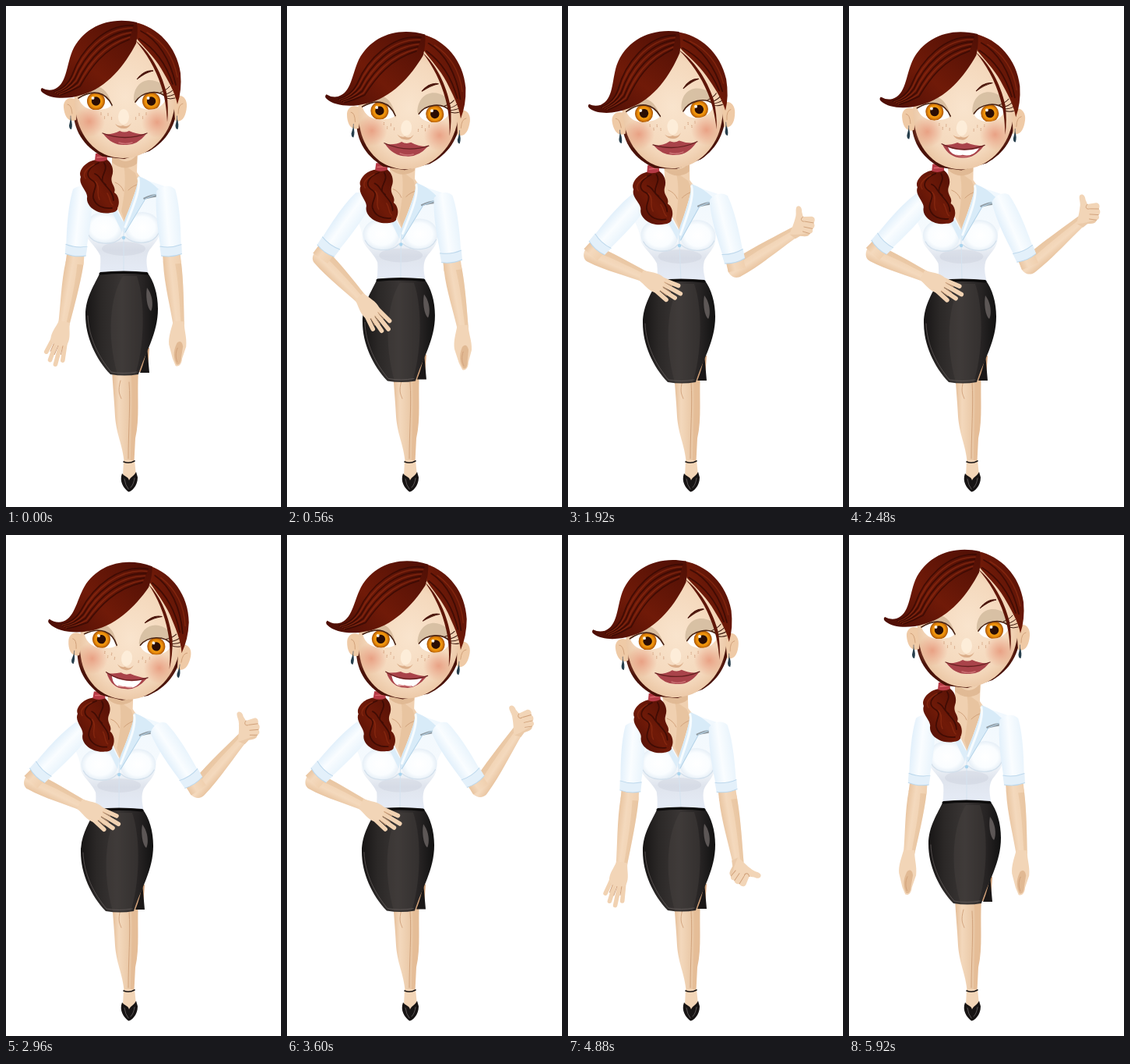
Recreate the animation shown at these times as an HTML page. Size 353x642 px, loop 6000 ms.

```html
<!DOCTYPE html>
<html lang="en">
<head>
<meta charset="utf-8">
<title>Presenter</title>
<style>
html, body { margin: 0; width: 100%; height: 100%; overflow: hidden; background: #fff; }
svg { display: block; width: 353px; height: 642px; }
.skin { fill: #f2d5b7; }
.shade { fill: #dfb68f; }
.line { fill: none; stroke-linecap: round; stroke-linejoin: round; }
.finger { fill: none; stroke: #f1d2b2; stroke-width: 5.6; stroke-linecap: round; }
.crease { fill: none; stroke: #cf9f78; stroke-width: .9; stroke-linecap: round; }
.dark { fill: none; stroke: #350803; stroke-width: 1.8; stroke-linecap: round; opacity: .75; }
.light { fill: none; stroke: #8c2b12; stroke-width: 1.5; stroke-linecap: round; opacity: .7; }
</style>
</head>
<body>
<svg viewBox="0 0 353 642">
<defs>
  <linearGradient id="hair" x1="0" y1="1" x2="1" y2="0">
    <stop offset="0" stop-color="#4a0d05"/><stop offset=".45" stop-color="#701a08"/><stop offset="1" stop-color="#4f0f05"/>
  </linearGradient>
  <linearGradient id="skirt">
    <stop offset="0" stop-color="#171515"/><stop offset=".22" stop-color="#2b2827"/><stop offset=".5" stop-color="#393534"/>
    <stop offset=".8" stop-color="#262323"/><stop offset="1" stop-color="#111"/>
  </linearGradient>
  <linearGradient id="shirt" x1="0" y1="0" x2="0" y2="1">
    <stop offset="0" stop-color="#f0f8fe"/><stop offset=".55" stop-color="#f6fafd"/>
    <stop offset=".75" stop-color="#dfe4ed"/><stop offset="1" stop-color="#e6ecf7"/>
  </linearGradient>
  <linearGradient id="sleeve">
    <stop offset="0" stop-color="#e2f0fb"/><stop offset=".45" stop-color="#fafdff"/><stop offset="1" stop-color="#e9f4fc"/>
  </linearGradient>
  <linearGradient id="arm">
    <stop offset="0" stop-color="#e9c5a1"/><stop offset=".4" stop-color="#f4d9bd"/><stop offset="1" stop-color="#f0d0af"/>
  </linearGradient>
  <linearGradient id="leg">
    <stop offset="0" stop-color="#e4bc96"/><stop offset=".35" stop-color="#f3d8bc"/><stop offset="1" stop-color="#e8c5a2"/>
  </linearGradient>
  <radialGradient id="face" cx=".5" cy=".5" r=".6">
    <stop offset="0" stop-color="#f9e4cd"/><stop offset=".65" stop-color="#f4d8bc"/><stop offset="1" stop-color="#e5bb95"/>
  </radialGradient>
  <radialGradient id="blush">
    <stop offset="0" stop-color="#e58f72" stop-opacity=".75"/><stop offset="1" stop-color="#e58f72" stop-opacity="0"/>
  </radialGradient>
  <radialGradient id="bust">
    <stop offset="0" stop-color="#fff"/><stop offset=".7" stop-color="#fafdff"/><stop offset="1" stop-color="#e6eff7"/>
  </radialGradient>
  <radialGradient id="iris">
    <stop offset="0" stop-color="#f7b021"/><stop offset=".7" stop-color="#ed900b"/><stop offset="1" stop-color="#a95305"/>
  </radialGradient>
  <clipPath id="clipL"><path d="M136 127C128 110 112 106 93 118C97 130 108 134 118 133C127 132 132 131 136 127Z"/></clipPath>
  <clipPath id="clipR"><path d="M166 123C174 110 195 106 206 117C202 130 190 134 180 132.500C172 131 168 128 166 123Z"/></clipPath>
  <g id="ball">
    <circle r="11.500" fill="url(#iris)"/><circle r="5.700" fill="#2a0d04"/>
    <circle cx="-4" cy="-4" r="2" fill="#fff" opacity=".9"/>
  </g>
  <g id="sleeveShape">
    <path d="M-12 -9C-5 -16 7 -16 12 -9C16 10 15 40 13 66L-13 66C-15 40 -16 12 -12 -9Z" fill="url(#sleeve)"/>
    <path d="M-14 62Q0 66 14 62L13.500 74Q0 78 -13.500 74Z" fill="#e3f0fa"/>
    <path d="M-14 62Q0 66 14 62M-13.500 74Q0 78 13.500 74" fill="none" stroke="#bdd8ec" stroke-width="1"/>
  </g>
  <g id="foreShape">
    <path d="M-11.500 0C-11.500 -15 11.500 -15 11.500 0C12 28 9 60 7 87L-7 87C-8 62 -13 28 -11.500 0Z" fill="url(#arm)"/>
    <path d="M3 -6C6 25 4 55 3 85L7 86C9 60 12 28 11.500 2Z" class="shade" opacity=".4"/>
  </g>
  <g id="openHand">
    <path class="finger" d="M-9 20L-14 39M-4 23L-7 48M2 24L1 52M7 20L9 45"/>
    <path class="skin" d="M-7 -4C-9 6 -14 13 -12 23C-7 30 6 30 10 24C13 14 8 6 7 -4Z"/>
    <path class="crease" d="M-7 27L-9 37M-1 28L-3 40M5 27L5 38"/>
  </g>
  <g id="sideHand">
    <path class="skin" d="M-7 -4C-10 8 -13 16 -12 26L-7 44L-3 53C2 55 5 49 5 44L10 28C11 16 7 8 7 -4Z"/>
    <path class="shade" d="M-2 24C-7 35 -6 43 -2 51C2 53 4 47 4 42L6 28C5 21 1 20 -2 24Z" fill-opacity=".9"/>
    <path d="M-1 30C-4 37 -3 43 -1 48" class="crease" stroke-width="1.500"/>
  </g>
  <g id="thumbHand">
    <path class="skin" d="M-6 3C-3 -6 -1 -12 0 -18C2 -24 -1 -29 1 -33C4 -36 8 -33 8 -27L10 -21L21 -22C26 -22 26 -16 24 -14C27 -11 25 -7 23 -6C25 -2 22 0 20 0C19 5 13 4 8 4L2 8Z"/>
    <path class="crease" d="M10 -21C6 -18 8 -14 12 -15M13 -15L24 -14M12 -8L23 -6.500M11 -2L20 0"/>
    <path class="shade" opacity=".35" d="M-5 3C4 3 12 1 21 -1C19 5 13 4 8 4L2 8Z"/>
  </g>
</defs>

<g id="legs">
  <path d="M154 466L170 466C168 500 172 528 166 554L164 594L157 594C159 550 151 515 154 466Z" fill="#e5bd97"/>
  <path d="M136 466L160 466C164 500 160 540 160 590L152 590C151 564 142 552 140 526C139 505 137 486 136 466Z" fill="url(#leg)"/>
  <path d="M147 480C143 494 146 498 148 503M158 482C160 510 157 545 157 580" class="crease" stroke-width="1.300"/>
  <path d="M151 582L150 602L157 614L167 602L165 582Z" class="skin"/>
  <path d="M151 584Q158 587 165 583" class="line" stroke="#171313" stroke-width="1.600"/>
  <path d="M149 599C145 609 151 618 157 622.500C160 623 169 616 169 604L167 597C164 603 159 604 158 608C157 603 152 603 149 599Z" fill="#171414"/>
  <path d="M152 606Q153 614 157 619M165 605Q164 613 160 617" class="line" stroke="#5b5656" stroke-width="1"/>
</g>

<g id="torso">
  <path d="M136 182L169 182L168 213C174 222 178 226 184 234L152 288L118 236C130 228 136 222 136 208Z" fill="#f0d0b0"/>
  <path d="M136 187C146 202 160 203 169 189L168 202C158 210 145 209 136 200Z" fill="#d8ac84" opacity=".6"/>
  <path d="M151 203C154 220 153 238 148 263L154 280L172 230L166 214Z" fill="#e2b992" opacity=".5"/>
  <path d="M140 226Q148 229 151 237M157 236Q163 230 171 228" class="crease"/>
  <path d="M126 224C112 229 96 230 88 237C88 258 100 272 101 285C100 298 115 306 121 320Q122 331 120 344L183 344C181 335 179 326 182 317C187 306 199 300 198 284C199 271 213 258 215 238C207 230 186 226 172 220L152 278Z" fill="url(#shirt)"/>
  <ellipse cx="151" cy="311" rx="28" ry="9" fill="#c9ced9" opacity=".4"/>
  <ellipse cx="126" cy="284" rx="24" ry="20" fill="url(#bust)"/>
  <ellipse cx="175" cy="284" rx="23" ry="20" fill="url(#bust)"/>
  <path d="M105 292C112 307 138 308 149 296M153 296C166 307 189 306 196 291" class="line" stroke="#d3e0ec" stroke-width="1.300"/>
  <path d="M151 276L151 340" class="line" stroke="#d4e3f0"/>
  <path d="M170 218C182 222 192 230 201 240L179 247L152 292C149 282 152 274 155 267C162 250 168 236 170 218Z" fill="#d8ebf8"/>
  <path d="M170 221C173 236 162 260 153 283" class="line" stroke="#f7fcff" stroke-width="3"/>
  <path d="M176 246Q188 240 200 241L200 244Q187 245 177 248Z" fill="#919ba2"/>
  <path d="M201 238L179 247L153 290" class="line" stroke="#b4d3e8" stroke-width="1"/>
  <path d="M129 220C118 225 109 233 103 243L128 247L149 290L151 278C143 264 132 245 129 220Z" fill="#dcedf9"/>
  <path d="M103 243L120 245" class="line" stroke="#9aa6af" stroke-width="2"/>
  <circle cx="151" cy="297" r="2.200" fill="#a9d4ee"/>
</g>

<g id="skirtG">
  <path d="M166 440L184 438L182 466L168 470Z" fill="#d0a078"/>
  <path d="M172 470C177 458 180 445 181 436L184 470Z" fill="#1a1717"/>
  <path d="M121 341Q151 338 181 341C190 352 195 370 195 388C195 420 179 443 170 472Q152 475 134 472C115 452 102 424 102 396C102 373 114 357 121 341Z" fill="url(#skirt)"/>
  <path d="M150 346C133 372 129 424 143 472L166 472C177 440 180 380 168 346Z" fill="#4b4543" opacity=".38"/>
  <path d="M181 361C189 371 189 386 186 391C181 387 179 371 181 361Z" fill="#77716f" opacity=".7"/>
  <path d="M105 397C106 425 119 450 135 469Q151 472 168 469" class="line" stroke="#686260" stroke-width="1" opacity=".7"/>
  <path d="M121 343Q151 340 181 343" class="line" stroke="#0c0b0b" stroke-width="3"/>
</g>

<g id="armL">
  <g class="fore"><use href="#foreShape" class="stretch"/><g class="hand">
    <use href="#openHand" data-kind="open"/><use href="#sideHand" data-kind="side" transform="rotate(-9)"/>
  </g></g>
  <path d="M-11 55L11 55L11.500 86L-11.500 86Z" fill="url(#arm)"/>
  <use href="#sleeveShape"/>
</g>
<g id="armR">
  <g class="fore"><use href="#foreShape" class="stretch"/><g class="hand">
    <use href="#sideHand" data-kind="side" transform="rotate(4)"/><use href="#thumbHand" data-kind="thumb" transform="rotate(123)"/>
  </g></g>
  <path d="M-11 55L11 55L11.500 86L-11.500 86Z" fill="url(#arm)"/>
  <use href="#sleeveShape"/>
</g>

<g id="pony">
  <path d="M117 197C101 198 92 213 96 219C92 229 106 238 104 246C103 258 119 268 134 265C139 265 144 262 143 259C147 251 144 242 139 239C142 231 133 228 136 218C140 207 133 198 128 196Z" fill="url(#hair)"/>
  <path class="dark" d="M119 201C105 207 101 217 110 223C121 229 110 237 112 246C115 257 126 260 136 259M126 201C132 210 121 217 124 225C129 233 138 238 138 249M114 215C122 218 120 224 128 229"/>
  <path class="light" d="M113 203C101 210 98 216 102 221M115 225C122 232 115 240 120 248M130 240C134 246 133 252 137 255"/>
  <path d="M115 189L129 188L130 197Q122 201 114 198Z" fill="#b63a46"/>
  <path d="M117 194L128 193" class="line" stroke="#dd6c70" stroke-width="1.300"/>
</g>

<g id="head">
  <path d="M86 128C86 160 99 179 124 193L152 196L184 186C207 172 218 154 222 120L210 70L100 75Z" fill="#4a1208"/>
  <path d="M92 121C82 114 73 120 74 130C75 142 81 150 90 146Z" fill="#efcaa6"/>
  <path d="M215 119C224 110 233 118 232 129C231 142 226 150 217 147Z" fill="#efcaa6"/>
  <path d="M79 126Q84 126 85 138M227 125Q221 126 221 138" class="crease" stroke-width="1.300"/>
  <path d="M88 104C86 143 96 170 119 186C137 197 159 198 178 188C204 174 218 147 218 108C215 65 190 38 160 38C118 40 91 67 88 104Z" fill="url(#face)"/>
  <path d="M100 111C115 95 131 104 137 130C128 121 116 112 96 119Z" fill="#d3b798" opacity=".85"/>
  <path d="M164 121C163 98 182 88 200 100Q206 107 206 116C193 107 176 110 166 123Z" fill="#d5bea1" opacity=".9"/>
  <path d="M168 94C174 86 181 82 189 83C181 85 176 88 168 94Z" fill="#4a150b" stroke="#4a150b"/>
  <circle cx="107" cy="148" r="20" fill="url(#blush)"/><circle cx="194" cy="149" r="20" fill="url(#blush)"/>
  <g clip-path="url(#clipL)"><path d="M85 100H140V140H85Z" fill="#fff"/><use href="#ball" id="eyeL"/></g>
  <g clip-path="url(#clipR)"><path d="M160 100H212V140H160Z" fill="#fff"/><use href="#ball" id="eyeR"/></g>
  <path d="M136 127C128 110 112 106 93 118M166 123C174 110 195 106 206 117" class="line" stroke="#4b2415" stroke-width="1.700"/>
  <path d="M202 114Q211 112 216 106M204 116Q212 116 218 112M205 118Q211 120 217 118M198 111Q206 108 210 103" class="line" stroke="#3b170d" stroke-width="1"/>
  <ellipse cx="151" cy="142" rx="7" ry="10" fill="#fff1df" opacity=".75"/>
  <path d="M140 151Q145 155 150 153Q156 156 161 150Q157 158 151 157Q144 157 140 151Z" fill="#d5a27c" opacity=".8"/>
  <g fill="#bd7e58" opacity=".65" id="freckles"></g>
  <path id="lips" fill="#a9434a"/>
  <path id="teeth" fill="#fff"/>
  <path id="smile" class="line" stroke="#65201f" stroke-width="1.300"/>
  <path id="shine" class="line" stroke="#d98283" stroke-width="1.600" opacity=".7"/>
  <path d="M166 21C194 27 219 51 224 86Q226 108 220 126C217 110 207 94 199 80C190 65 177 53 168 42Z" fill="url(#hair)"/>
  <path class="dark" d="M173 32C195 43 211 69 218 101M171 42C192 55 206 76 214 100"/>
  <path class="light" d="M181 34C202 46 215 65 220 91"/>
  <path d="M166 44C184 58 199 83 206 111Q209 130 207 149C206 130 204 117 199 102C192 80 180 60 166 44Z" fill="#5f1608"/>
  <path d="M168 21C132 13 99 27 85 58C77 78 78 101 61 107Q53 109 46 105Q43 108 47 111C57 119 78 120 97 114C130 105 153 75 167 48Q170 34 168 21Z" fill="url(#hair)"/>
  <g id="strands"></g>
  <path d="M83 141L83 145M219.500 141L219.500 145" class="line" stroke="#777" stroke-width="1"/>
  <path id="ear" d="M83 144Q86 152 84 158Q81 158 81 153Z" fill="#263e4c"/>
  <path d="M219.500 144Q222.500 152 220.500 158Q217.500 158 217.500 153Z" fill="#263e4c"/>
</g>
</svg>

<script>
const LOOP = 6000, STEP = 80, UPPER = 84, FORE = 85;
const $ = id => document.getElementById(id);
const set = (el, name, value) => el.setAttribute(name, value);

// Each row: time, then values.
const headTrack = [ // x, y, turn
  [0, 0, 0, 0], [80, 0, 0, 0], [720, 2, 17, 4], [1120, 5.5, 17.5, 8], [1360, 5.5, 17, 8],
  [1840, -16, 13, -4.2], [2160, -16, 13, -4.2], [2800, 3, 16, 7.5], [3280, 3, 16, 7.5],
  [4000, -2, 12.5, 2.7], [4320, -2, 12.5, 2.7], [4800, -12.5, 13, -1.7], [5120, -12.5, 13, -1.7],
  [5840, 0, 0, 0], [6000, 0, 0, 0]
];
const bodyTrack = [ // x, y, lean
  [0, 0, 0, 0], [80, 0, 0, 0], [720, -6, 10, 1], [1120, -6, 10, 2.5], [1360, -6, 10, 2.5],
  [1840, -6, 10, -4.5], [2160, -6, 10, -4.5], [2800, -6, 10, .5], [3280, -6, 10, .5],
  [4000, -6, 9, 1.5], [4320, -6, 9, 1.5], [4800, -6, 9, -6], [5120, -6, 9, -6],
  [5840, 0, 0, 0], [6000, 0, 0, 0]
];
const leftTrack = [ // upper angle, forearm angle, forearm length
  [0, 6, 10, 81], [80, 6, 10, 81], [800, 46, -62.7, 72], [1360, 46, -62.7, 72],
  [1840, 42, -66.6, 73], [2160, 42, -66.6, 73], [2800, 44, -64.5, 72], [3840, 44, -64.5, 72],
  [4240, 13, -5, 79], [4320, 13, -5, 79], [4800, 4, 7, 86], [5120, 4, 7, 86],
  [5840, 6, 8, 80], [6000, 6, 8, 80]
];
const rightTrack = [
  [0, -5, -6, 80], [400, -5, -6, 80], [1040, -21.5, -29, 64], [1200, -21.5, -29, 64],
  [1760, -14.5, -122, 87], [2160, -14.5, -122, 87], [2800, -33, -138.8, 86], [3280, -33, -138.8, 86],
  [4000, -35, -157, 88], [4400, -35, -157, 88], [4880, -7.8, -9, 83], [5200, -7.8, -9, 83],
  [5840, -5, -6, 80], [6000, -5, -6, 80]
];
const mouthTrack = [[0, 0], [640, 0], [960, 1], [1360, 1], [1680, 0], [2240, 0], [2640, 1], [4400, 1], [4720, 0], [6000, 0]];
const gazeTrack = [[0, 0], [3520, 0], [3840, 7], [4320, 7], [4640, 0], [6000, 0]];

function at(track, t) {
  const i = track.findIndex(row => row[0] > t);
  const a = track[i - 1], b = track[i];
  const p = (t - a[0]) / (b[0] - a[0]);
  const e = p * p * (3 - 2 * p);
  return a.slice(1).map((v, k) => v + (b[k + 1] - v) * e);
}

function poseArm(id, x, y, [upper, fore, len], kind) {
  const arm = $(id);
  set(arm, "transform", `translate(${x} ${y}) rotate(${upper})`);
  set(arm.querySelector(".fore"), "transform", `translate(0 ${UPPER}) rotate(${fore - upper})`);
  set(arm.querySelector(".stretch"), "transform", `scale(1 ${len / FORE})`);
  set(arm.querySelector(".hand"), "transform", `translate(0 ${len}) rotate(3)`);
  for (const el of arm.querySelectorAll("[data-kind]"))
    set(el, "display", el.dataset.kind === kind ? "inline" : "none");
}

function drawMouth(o) {
  const lx = 125 + 3 * o, top = 160 + o, low = 182 + 3 * o;
  const upper = 172 + 2 * o, lower = 173 + 10 * o;
  set($("lips"), "d", `M${lx} 164Q138 ${165 - o} 146 ${top}Q152 ${top + 3} 158 ${top}Q168 ${165 - o} 180 164Q168 ${low - 3} 153 ${low - 4}Q136 ${low - 3} ${lx} 164Z`);
  set($("teeth"), "d", `M${lx + 7} 167Q153 ${upper} 174 167Q166 ${lower} 153 ${lower - 5 * o}Q139 ${lower} ${lx + 7} 167Z`);
  set($("teeth"), "opacity", Math.min(1, o * 2));
  set($("smile"), "d", `M${lx - 1} 163Q153 ${upper + 2} 181 163`);
  set($("shine"), "d", `M145 ${175 + 3 * o}Q153 ${178 + 2 * o} 162 ${175 + 3 * o}`);
}

function draw(t) {
  const [hx, hy, turn] = at(headTrack, t);
  const [bx, by, lean] = at(bodyTrack, t);
  set($("head"), "transform", `translate(${hx} ${hy}) rotate(${turn} 151 150)`);
  set($("torso"), "transform", `matrix(1 0 ${-lean / 100} 1 ${bx + lean * 3.41} ${by})`);
  set($("skirtG"), "transform", `translate(${bx} ${by})`);

  // The hair tie stays on the head while the tail turns half as far.
  const r = turn * Math.PI / 180, c = Math.cos(r), s = Math.sin(r);
  const px = hx + 29 - 29 * c - 43 * s, py = hy - 43 - 29 * s + 43 * c;
  set($("pony"), "transform", `translate(${px} ${py}) rotate(${turn / 2} 122 193)`);

  const sx = bx + lean, sy = 245 + by;
  poseArm("armL", 97 + sx, sy, at(leftTrack, t), t < 5520 ? "open" : "side");
  poseArm("armR", 206 + sx, sy, at(rightTrack, t), t < 640 || t >= 5440 ? "side" : "thumb");

  const [gaze] = at(gazeTrack, t);
  set($("eyeL"), "transform", `translate(${115.5 + gaze} 122)`);
  set($("eyeR"), "transform", `translate(${186.5 + gaze} 122)`);
  drawMouth(at(mouthTrack, t)[0]);
}

function addDetails() {
  let strands = "", dots = "";
  for (let i = 0; i < 7; i++) {
    const k = i / 6;
    strands += `<path class="${i % 2 ? "light" : "dark"}" d="M${163 - 5 * k} ${25 + 18 * k}C${126 - k * 2} ${23 + 33 * k} ${96 + k * 12} ${57 + 23 * k} ${85 + k * 10} ${88 + 15 * k}Q${78 + k * 4} ${105 + 5 * k} ${62 + k * 8} ${110 + 4 * k}"/>`;
  }
  for (let i = 0; i < 8; i++) {
    const x = 122 + (i % 4) * 4.5, y = 137 + (i * 5 % 9);
    dots += `<circle cx="${x}" cy="${y}" r=".7"/><circle cx="${302 - x}" cy="${y}" r=".7"/>`;
  }
  $("strands").innerHTML = strands;
  $("freckles").innerHTML = dots;
}

addDetails();
const start = performance.now();
function tick() {
  const t = (performance.now() - start) % LOOP;
  draw(Math.floor(t / STEP) * STEP);
  requestAnimationFrame(tick);
}
tick();
</script>
</body>
</html>
```
